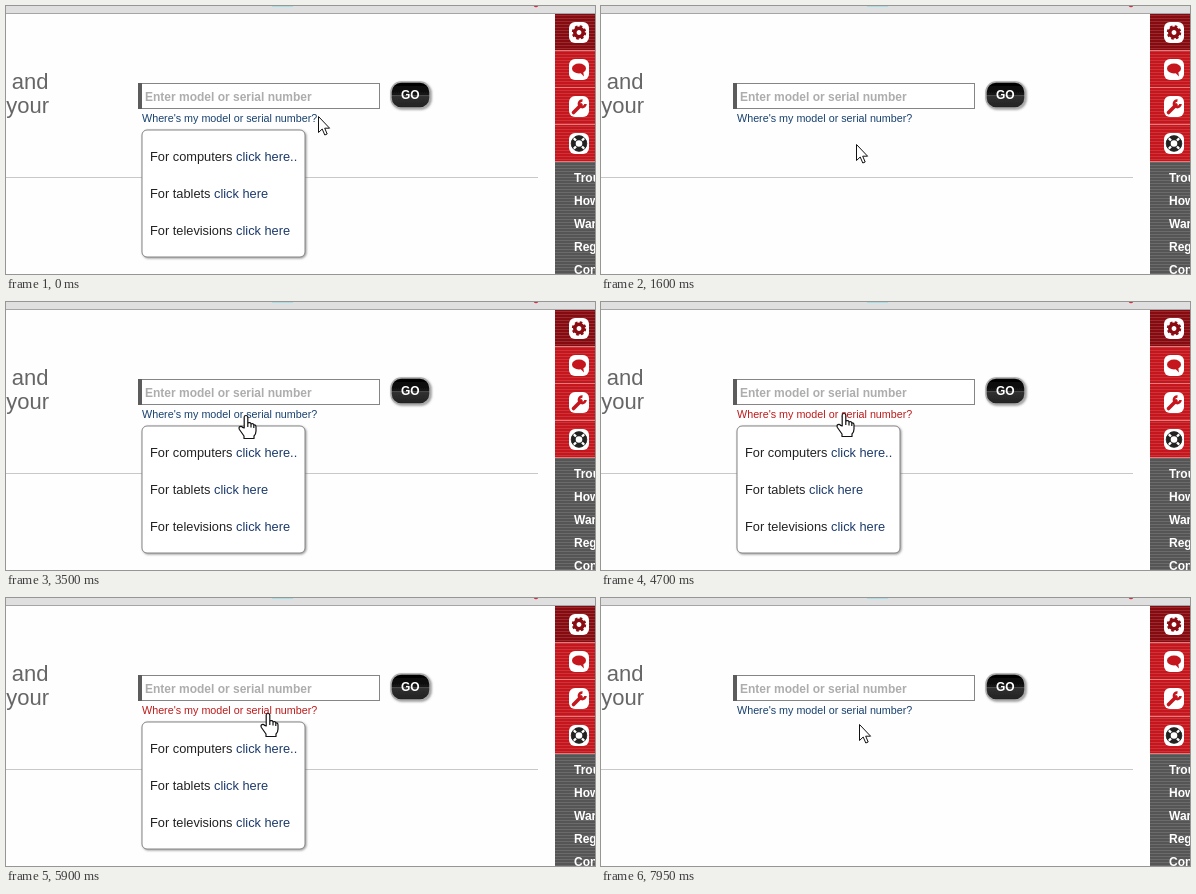
Write an HTML page that moves like this. It is 589 px wide and 268 px high and loops after 8000 ms.

```html
<!DOCTYPE html>
<html lang="en">
<head>
<meta charset="utf-8">
<title>Model number help</title>
<style>
  html, body { margin: 0; width: 100%; height: 100%; overflow: hidden; background: #fefefe; }
  svg { display: block; font-family: "Liberation Sans", Arial, sans-serif; }
  .big { font-size: 22px; fill: #666; }
  .bold { font-size: 12px; font-weight: bold; fill: #fff; }
  .pop { font-size: 12.8px; fill: #222; }
  .pop tspan { fill: #1c3a6b; }
  .cursor { fill: #fff; stroke: #111; stroke-linejoin: round; }
</style>
</head>
<body>
<svg width="589" height="268" viewBox="0 0 589 268">
  <defs>
    <pattern id="stripes" width="4" height="3" patternUnits="userSpaceOnUse">
      <path d="M0 .5H4" stroke="#fff" stroke-opacity=".13"/>
    </pattern>
    <linearGradient id="button" x2="0" y2="1">
      <stop stop-color="#000"/><stop offset=".48" stop-color="#151515"/>
      <stop offset=".5" stop-color="#555"/><stop offset=".56" stop-color="#303030"/>
      <stop offset="1" stop-color="#222"/>
    </linearGradient>
    <filter id="shadow" x="-10%" y="-10%" width="125%" height="125%">
      <feDropShadow dx="1" dy="1" stdDeviation=".8" flood-color="#555" flood-opacity=".6"/>
    </filter>
  </defs>

  <rect width="589" height="7" fill="#dfdfdf"/>
  <path d="M0 7.5H589" stroke="#a5a5a5"/>
  <path d="M266 0H287" stroke="#a8dfe6" stroke-width="2"/>
  <circle cx="530" cy="-1" r="2.3" fill="#c34"/>

  <text class="big" x="-4.5" y="59">,</text>
  <text class="big" x="42.5" y="83" text-anchor="end">and</text>
  <text class="big" x="43" y="107" text-anchor="end">your</text>
  <path d="M0 171.5H532" stroke="#c8c8c8"/>

  <rect x="132.5" y="77.5" width="241" height="25" fill="#fff" stroke="#858585"/>
  <path d="M134 77V103" stroke="#5c5c5c" stroke-width="4"/>
  <text class="bold" x="139" y="95" style="fill:#adadad">Enter model or serial number</text>
  <text id="link" x="136" y="116" font-size="10.75">Where's my model or serial number?</text>

  <rect x="385" y="76" width="39" height="26" rx="10" fill="url(#button)" stroke="#aaa" stroke-width="1.5" filter="url(#shadow)"/>
  <text class="bold" x="395" y="93">GO</text>

  <g id="side"></g>

  <g id="popup">
    <rect x="136" y="124" width="163" height="127" rx="5" fill="#fff" stroke="#858585" filter="url(#shadow)"/>
    <text class="pop" x="144" y="155">For computers <tspan>click here..</tspan></text>
    <text class="pop" x="144" y="192">For tablets <tspan>click here</tspan></text>
    <text class="pop" x="144" y="229">For televisions <tspan>click here</tspan></text>
  </g>

  <path id="arrow" class="cursor" d="M.5 .5V16.5L4.2 13L6.8 19L9.2 18L6.7 12.2H11.6Z"/>
  <path id="hand" class="cursor" stroke-width="1.2" d="M-1.8 13V2Q-1.8 .5 0 .5T1.8 2V8Q4.6 6.8 5 9Q7.4 8 7.8 10Q10 9.4 10 12V16Q10 19 8 21V23.5H-2V21L-6.6 14.5Q-7.6 12.3-6 11.6T-3.4 12.4ZM1.8 8V12M5 9V12.5M7.8 10V13"/>
</svg>
<script>
const $ = id => document.getElementById(id);
const LOOP = 8000, STEP = 50;

// Sidebar
const icons = [
  `<circle r="4.2" fill="none" stroke="#8a0c12" stroke-width="3.6"/>
   <circle r="6.2" fill="none" stroke="#8a0c12" stroke-width="2" stroke-dasharray="2.6 2.27"/>`,
  `<ellipse cy="-1" rx="7" ry="5" fill="#c4161c"/><path d="M0 2L5 7L4 1Z" fill="#c4161c"/>`,
  `<path d="M-5.5 6L2-1.5" stroke="#c4161c" stroke-width="3.6" stroke-linecap="round"/>
   <path d="M3.5-6A3.3 3.3 0 1 0 6.5-2.5" fill="none" stroke="#c4161c" stroke-width="2.6"/>`,
  `<circle r="5.6" fill="none" stroke="#222" stroke-width="4.6"/>
   <path d="M-6-6L-3-3M6-6L3-3M-6 6L-3 3M6 6L3 3" stroke="#fff" stroke-width="2.4"/>
   <circle r="7.8" fill="none" stroke="#222" stroke-width=".8"/>`
];
const cells = icons.map((icon, i) => {
  const y = 8 + 37 * i;
  return `<rect x="549" y="${y}" width="40" height="37" fill="${i ? '#c4161c' : '#860b11'}"/>
    <rect x="549" y="${y}" width="40" height="37" fill="url(#stripes)"/>
    <path d="M549 ${y + 36.5}H589" stroke="#e27b7b"/>
    <rect x="563" y="${y + 8}" width="20" height="21" rx="6" fill="#fff"/>
    <g transform="translate(573 ${y + 18.5})">${icon}</g>`;
});
const labels = ['Troubleshooting', 'How to', 'Warranty', 'Register', 'Contact'].map((label, i) =>
  `<text class="bold" x="568" y="${176 + 23 * i}">${label}</text>`);
$('side').innerHTML = `<rect x="549" y="156" width="40" height="112" fill="#555"/>
  <rect x="549" y="156" width="40" height="112" fill="url(#stripes)"/>` + cells.join('') + labels.join('');

// Pointer moves: start, end, x, y; it rests in between
const moves = [
  [50, 550, 284, 130], [650, 950, 262, 113],
  [1300, 1600, 255, 138], [1750, 2050, 240, 114], [2150, 2250, 239, 113],
  [3000, 3250, 240, 128], [3450, 3500, 239.5, 113], [3500, 3650, 242, 112],
  [3750, 3950, 243, 113], [4250, 4400, 244, 126], [4550, 4700, 243, 111],
  [5000, 5100, 246, 125], [5250, 5400, 252, 114], [5500, 5650, 256, 125],
  [5750, 5900, 262, 115], [6100, 6500, 258, 142], [6750, 7050, 256, 130],
  [7050, 7150, 256, 116], [7300, 7600, 257, 136], [7600, 7950, 258, 126]
];

function pointer(t) {
  let x = 312, y = 110;
  for (const [start, end, toX, toY] of moves) {
    const k = Math.min(1, Math.max(0, (t - start) / (end - start)));
    x += (toX - x) * k;
    y += (toY - y) * k;
  }
  return { x, y, over: x < 311 && y < 119 };
}

function draw(now) {
  const t = Math.floor(now % LOOP / STEP) * STEP;
  const { x, y, over } = pointer(t);
  const show = (id, on) => $(id).setAttribute('visibility', on ? 'visible' : 'hidden');
  show('popup', over || t < 100);
  show('hand', over);
  show('arrow', !over);
  $('link').setAttribute('fill', over && pointer(t - STEP).over ? '#bd1a1a' : '#17406f');
  for (const id of ['hand', 'arrow'])
    $(id).setAttribute('transform', `translate(${Math.round(x)} ${Math.round(y)})`);
  requestAnimationFrame(draw);
}
requestAnimationFrame(draw);
</script>
</body>
</html>
```
